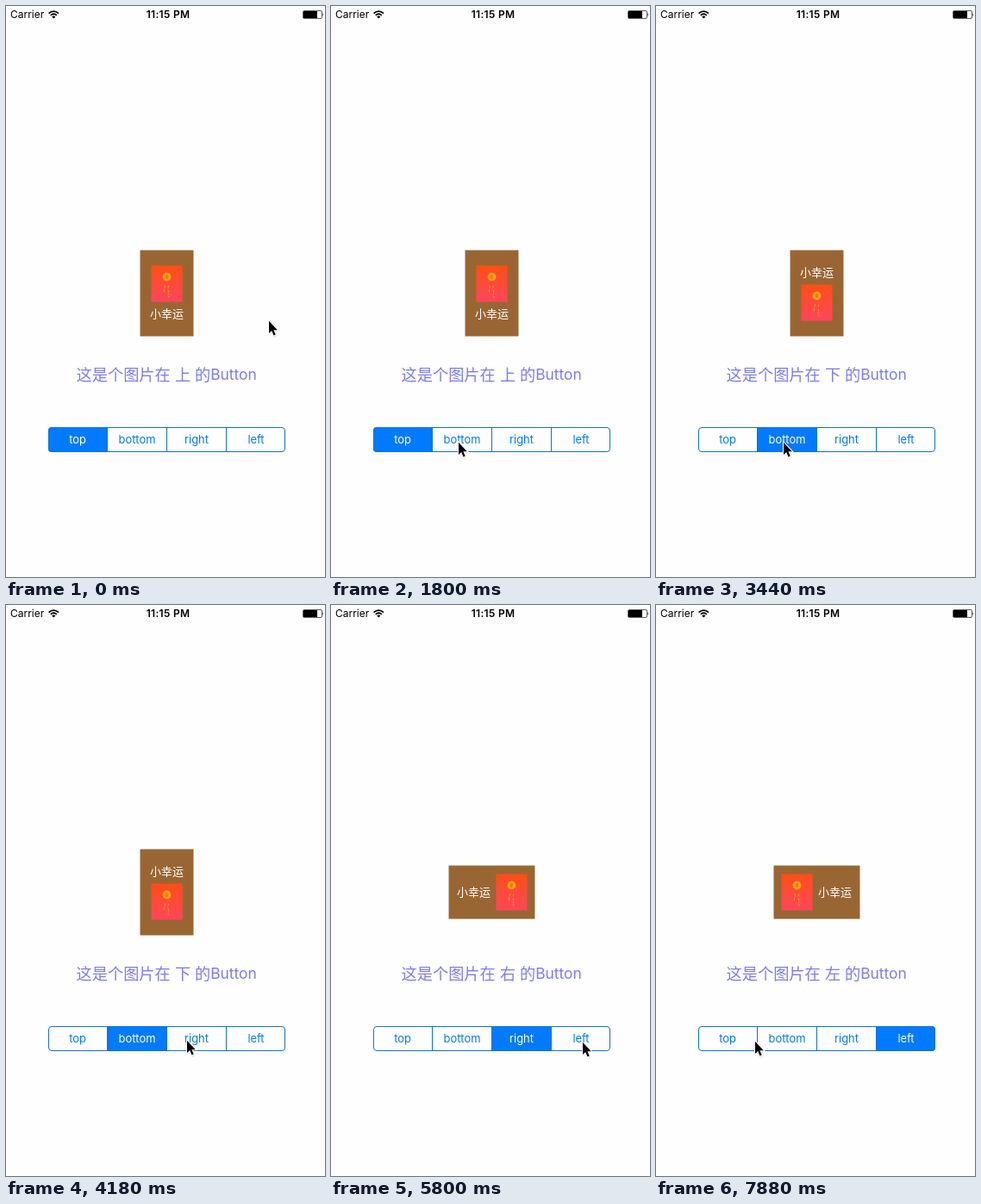
These frames come from a looping animation (370 px wide and 663 px high, 8000 ms). An HTML page:

```html
<!DOCTYPE html>
<html lang="zh-CN">
<head>
<meta charset="utf-8">
<title>Button layouts</title>
<style>
html, body { margin: 0; width: 100%; height: 100%; overflow: hidden; background: #fefefe; }
svg { display: block; width: 370px; height: 663px; }
text { font-family: Inter, sans-serif; }
.cjk { font-family: "Noto Sans CJK SC", "Noto Sans CJK", sans-serif; font-weight: 300; }
</style>
</head>
<body>
<svg viewBox="0 0 370 663">
  <defs>
    <linearGradient id="red" x1="0" y1="0" x2="0" y2="1">
      <stop offset="0" stop-color="#ff4f16"/>
      <stop offset="1" stop-color="#ff455c"/>
    </linearGradient>
    <filter id="soft" x="-50%" y="-50%" width="200%" height="200%">
      <feGaussianBlur stdDeviation="1"/>
    </filter>
    <clipPath id="bar"><rect x="49" y="489" width="275" height="29" rx="4"/></clipPath>
  </defs>
  <rect width="370" height="663" fill="#fefefe"/>

  <text x="5" y="14.3" font-size="12">Carrier</text>
  <g fill="none" stroke="#000" stroke-width="1.8">
    <path d="M49.6 8.7Q55.3 3.6 61 8.7"/>
    <path d="M51.8 10.9Q55.3 7.7 58.8 10.9"/>
  </g>
  <path d="M53.2 12.4Q55.3 10.7 57.4 12.4L55.3 14.6Z"/>
  <text x="188" y="14.3" font-size="12" font-weight="600" letter-spacing=".3" text-anchor="middle">11:15 PM</text>
  <rect x="344.5" y="5.5" width="22" height="9" rx="1.5" fill="none" stroke="#333" stroke-width=".8"/>
  <rect x="345" y="6" width="16" height="8" rx=".5"/>
  <path d="M367.5 8.3Q369.2 10 367.5 11.7Z"/>

  <rect id="card" fill="#996633"/>
  <g id="envelope">
    <rect x="-18" y="-21" width="36" height="42" fill="url(#red)"/>
    <path d="M-18 -19L0 -8L18 -19" fill="none" stroke="#e03a18" stroke-opacity=".35" stroke-width=".8"/>
    <circle cy="-8" r="4.9" fill="#f6a012"/>
    <path d="M-1.8 -9h3.6M-1.8 -7h3.6M0 -10v4.4" stroke="#cf7412" stroke-width=".8"/>
    <path d="M-2 2l-.6 3M-2.8 6l-.5 4M2.2 2l-.7 3M1.5 7l.9 3M2.4 11l-1 2M1.7 14l1.2 2"
          fill="none" stroke="#eb9a28"/>
  </g>
  <text id="caption" class="cjk" font-size="13" fill="#fff" text-anchor="middle">小幸运</text>

  <g font-size="18.2" fill="#7b7bff">
    <text class="cjk" x="81.6" y="434.8">这是个图片在</text>
    <text class="cjk" id="side" x="196" y="434.8"></text>
    <text class="cjk" x="219" y="434.8">的</text>
    <text x="237.2" y="434.4" font-size="17.4">Button</text>
  </g>

  <g id="tabs" clip-path="url(#bar)"></g>
  <g fill="none" stroke="#0c72da">
    <rect x="49.5" y="489.5" width="274" height="28" rx="3.5"/>
    <path d="M117.5 490V517M186.5 490V517M255.5 490V517"/>
  </g>
  <g id="labels" font-size="12.9" text-anchor="middle"></g>

  <g id="cursor">
    <path d="M1 2V16L4.5 13L7 19L9.4 18L7 12.4H11Z" opacity=".3" filter="url(#soft)"/>
    <path d="M1 .8V15L4.2 12L6.5 17.4L8.7 16.5L6.4 11.2H10.8Z" stroke="#fff" stroke-width="2" paint-order="stroke"/>
  </g>
</svg>
<script>
const LOOP = 8000;
const TICK = 148.6;   // the picture only changes on ticks
const BLUE = [0, 122, 255];
const names = ["top", "bottom", "right", "left"];
const sides = [..."上下右左"];

// tick at which each tab takes over
const picks = [-1, 22, 32, 47];
const press = { tab: 1, tick: 21 };

// pointer moves: ticks, end point, sideways bow
const home = [304, 365];
const glides = [
  { from: 1, to: 2, end: [295, 367] },
  { from: 4, to: 5, end: [188, 460] },
  { from: 6, to: 12, end: [147, 506], bow: [-17, 0] },
  { from: 24, to: 28, end: [209, 505] },
  { from: 34, to: 39, end: [291, 507] },
  { from: 49, to: 53, end: [114, 506], bow: [0, 5] }
];

const $ = id => document.getElementById(id);
const set = (el, attrs) => { for (const k in attrs) el.setAttribute(k, attrs[k]); };
const clamp = v => Math.max(0, Math.min(1, v));
const easeOut = k => 1 - (1 - k) ** 2;
const mix = (a, b, k) => a.map((v, i) => v + (b[i] - v) * k);

function add(parent, tag, attrs) {
  const el = document.createElementNS("http://www.w3.org/2000/svg", tag);
  set(el, attrs);
  return parent.appendChild(el);
}

const tabs = names.map((name, i) => {
  const fill = add($("tabs"), "rect", { x: 48.5 + 69 * i, y: 489, width: 69, height: 29, fill: "#007aff" });
  const label = add($("labels"), "text", { x: 83 + 69 * i, y: 508 });
  label.textContent = name;
  return { fill, label };
});

function pointer(tick) {
  let pos = home;
  for (const { from, to, end, bow = [0, 0] } of glides) {
    const k = easeOut(clamp((tick - from) / (to - from)));
    pos = mix(pos, end, k).map((v, i) => v + bow[i] * Math.sin(Math.PI * k));
  }
  return pos;
}

function drawCard(pick) {
  const upright = pick < 2;
  const sign = pick === 0 || pick === 3 ? -1 : 1;
  const [width, height] = upright ? [62, 100] : [100, 62];
  const place = d => upright ? [186.5, 333.5 + d] : [186.5 + d, 333.5];
  const [x, y] = place(-sign * (upright ? 24 : 21));
  set($("card"), { x: 186.5 - width / 2, y: 333.5 - height / 2, width, height });
  set($("envelope"), { transform: `translate(${place(sign * (upright ? 11 : 23))})` });
  set($("caption"), { x, y: y + 4.8 });
  $("side").textContent = sides[pick];
}

function draw(t) {
  const tick = Math.floor(t / TICK);
  const pick = picks.filter(p => p <= tick).length - 1;
  const fading = tick === picks[pick];
  drawCard(pick);

  tabs.forEach(({ fill, label }, i) => {
    let k = 0;
    if (i === pick) k = fading ? .82 : 1;
    else if (fading && i === pick - 1) k = .23;
    else if (i === press.tab && tick === press.tick) k = .16;
    set(fill, { "fill-opacity": k });
    set(label, { fill: `rgb(${mix(BLUE, [255, 255, 255], k).map(Math.round)})` });
  });

  set($("cursor"), { transform: `translate(${pointer(tick)})` });
}

const start = performance.now();
function frame() {
  draw((performance.now() - start) % LOOP);
  requestAnimationFrame(frame);
}
draw(0);
requestAnimationFrame(frame);
</script>
</body>
</html>
```
